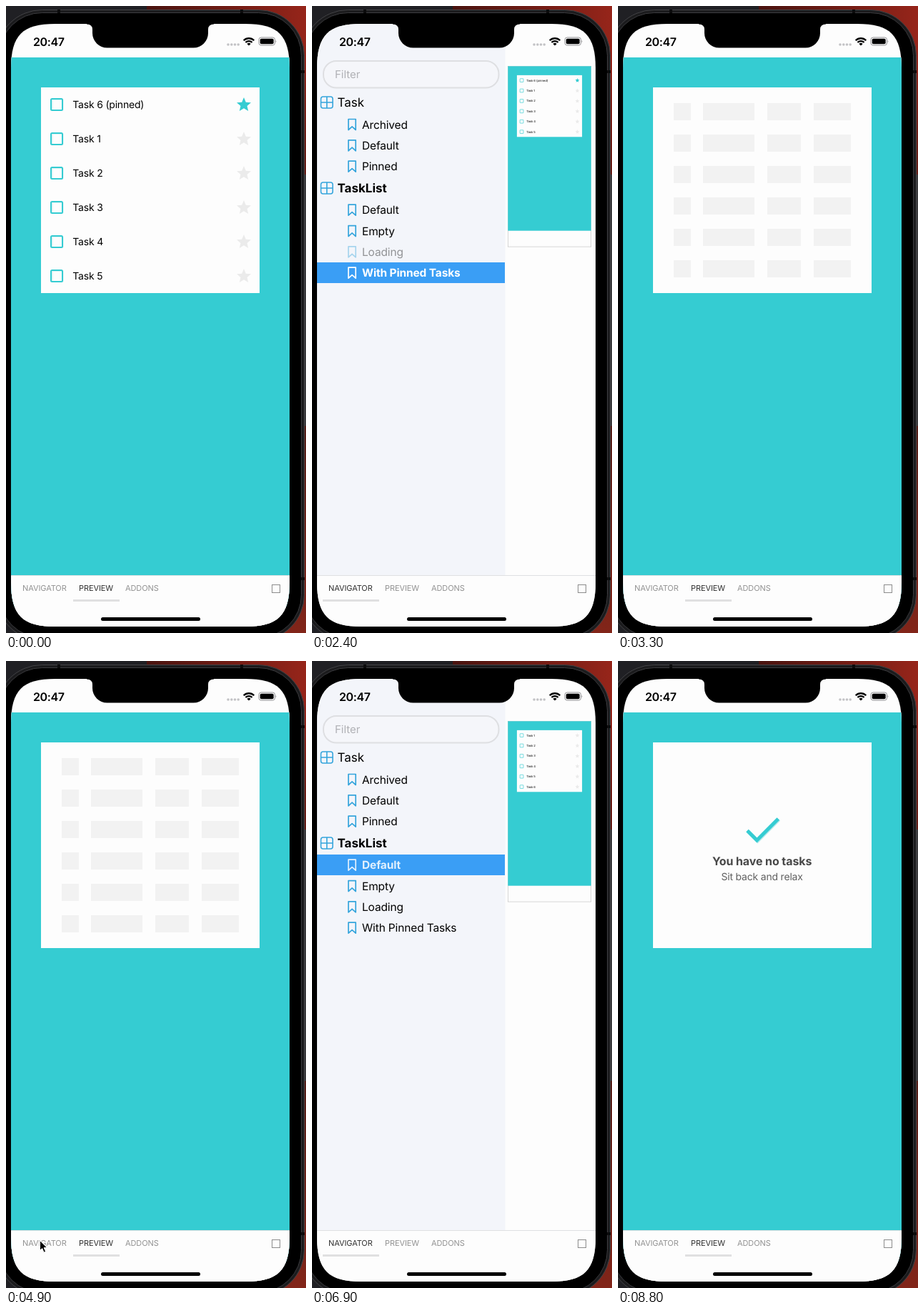
An HTML page for the animation above (9900 ms loop, 420x878 px).

```html
<!DOCTYPE html>
<html lang="en">
<head>
<meta charset="utf-8">
<title>Task list stories</title>
<style>
html, body { margin: 0; width: 100%; height: 100%; overflow: hidden; background: #000; }
svg { display: block; width: 420px; height: 878px; }
text { font-family: Inter, Roboto, "Liberation Sans", sans-serif; text-rendering: geometricPrecision; white-space: pre; }
</style>
</head>
<body>
<svg id="stage" viewBox="0 0 420 878">
  <defs>
    <linearGradient id="redTop"><stop offset="0" stop-color="#4a1410"/><stop offset="1" stop-color="#96251a"/></linearGradient>
    <linearGradient id="redSide" x2="0" y2="1">
      <stop offset="0" stop-color="#96251a"/><stop offset=".15" stop-color="#6b1c15"/>
      <stop offset=".5" stop-color="#3f1916"/><stop offset="1" stop-color="#822519"/>
    </linearGradient>
    <clipPath id="screenClip">
      <path d="M69 25H335C381 25 397 41 397 87V807C397 853 381 869 335 869H69C23 869 7 853 7 807V87C7 41 23 25 69 25Z"/>
    </clipPath>
  </defs>

  <rect width="420" height="878" fill="#202024"/>
  <rect x="197" width="223" height="60" fill="url(#redTop)"/>
  <rect x="340" y="60" width="80" height="818" fill="url(#redSide)"/>
  <g id="body">
    <rect x="-13.5" y="5.5" width="431" height="883" rx="64" fill="#1b1b1d" stroke="#434346"/>
    <rect x="-9.5" y="9.5" width="423" height="875" rx="60" fill="#000" stroke="#3c3c3f"/>
    <path d="M74 5v5M330 5v5M413 92h5M413 802h5" stroke="#0b0b0c" stroke-width="4"/>
    <path d="M419 236V588" stroke="#39393b" stroke-width="2"/>
  </g>

  <g clip-path="url(#screenClip)">
    <rect x="7" y="25" width="390" height="844" fill="#fdfdfd"/>
    <g id="preview">
      <rect width="390" height="844" fill="#fdfdfd"/>
      <rect id="border" x=".5" y=".5" width="389" height="843" fill="none" stroke="#000" stroke-opacity=".5"/>
      <g id="page">
        <rect id="backdrop" fill="#35ccd2"/>
        <rect id="card" x="42" y="42" height="288" fill="#fdfdfd"/>
      </g>
    </g>
    <g id="sidebar">
      <rect x="7" y="25" width="263.5" height="772" fill="#f3f5fa"/>
      <rect x="16" y="77" width="245.5" height="37.5" rx="18" fill="#f5f6fa" stroke="#dedfe2" stroke-width="2"/>
    </g>
    <g id="tabs">
      <rect x="7" y="797" width="390" height="72" fill="#fdfdfd"/>
      <path d="M7 797.5H397" stroke="#dfe0e2"/>
      <rect id="underline" y="831" height="3" fill="#e0e0e1"/>
      <rect x="372.5" y="810.5" width="11" height="11" fill="none" stroke="#8c8c8c"/>
    </g>
    <g id="status">
      <g fill="#c3c3c6"><circle cx="311" cy="54" r="1.8"/><circle cx="315.8" cy="54" r="1.8"/><circle cx="320.5" cy="54" r="1.8"/><circle cx="325.2" cy="54" r="1.8"/></g>
      <g fill="none" stroke="#000" stroke-width="2.3">
        <path d="M332.7 48.3a10.3 10.3 0 0 1 14.6 0M335.4 51a6.5 6.5 0 0 1 9.2 0"/>
      </g>
      <path d="M340 55.6l-2.6-2.6a3.7 3.7 0 0 1 5.2 0z"/>
      <rect x="354" y="44" width="22.5" height="11" rx="3.2" fill="none" stroke="#909093"/>
      <rect x="355.7" y="45.7" width="19" height="7.6" rx="1.8"/>
      <path d="M377.7 47.7q1.8 1.8 0 3.7z" fill="#909093"/>
    </g>
    <path d="M113 24V25.5Q121 25.5 121 33V38A20.5 20.5 0 0 0 141.5 58.5H262.5A20.5 20.5 0 0 0 283 38V33Q283 25.5 291 25.5V24Z"/>
    <rect x="133" y="856" width="139" height="5" rx="2.5"/>
  </g>
  <path id="cursor" d="M47.5 811.5V825.5L50.7 822.6L53.1 828.2L55.6 827.1L53.2 821.6H57.5Z" fill="#000" stroke="#fff" stroke-width="1"/>
</svg>

<script>
const LOOP = 9900;
const TEAL = '#35ccd2';
const BLUE = '#35a5dc';
const $ = id => document.getElementById(id);

function set(el, attrs) {
  for (const key in attrs) el.setAttribute(key, attrs[key]);
  return el;
}

function add(parent, tag, attrs) {
  return parent.appendChild(set(document.createElementNS('http://www.w3.org/2000/svg', tag), attrs));
}

// midY is the middle of the capitals
function label(parent, str, x, midY, size, attrs = {}) {
  const el = add(parent, 'text', { x, y: midY + size * 0.36, 'font-size': size, ...attrs });
  el.textContent = str;
  return el;
}

const show = (el, on) => set(el, { visibility: on ? 'visible' : 'hidden' });

// ---- status bar and tabs
label($('status'), '20:47', 38, 50, 16, { 'font-weight': 600, 'letter-spacing': -0.4 });

const tabs = [
  { name: 'PREVIEW', x: 102, left: 94, width: 65 },
  { name: 'NAVIGATOR', x: 23, left: 15, width: 79 },
  { name: 'ADDONS', x: 167 }
];
for (const tab of tabs) {
  tab.el = label($('tabs'), tab.name, tab.x, 814.7, 11, { 'letter-spacing': -0.1 });
}

// ---- sidebar
const sidebar = $('sidebar');
label(sidebar, 'Filter', 32, 96, 15, { fill: '#b0b1b5' });
const highlight = add(sidebar, 'rect', { x: 7, width: 263, height: 29, fill: '#3a9ef5' });

function heading(name, y, weight) {
  add(sidebar, 'path', {
    d: `M15.5 ${y - 8}h10.5q3 0 3 3v10q0 3-3 3h-10.5q-3 0-3-3v-10q0-3 3-3zM20.8 ${y - 8}v16M12.5 ${y}h16.5`,
    fill: 'none', stroke: BLUE, 'stroke-width': 1.6
  });
  label(sidebar, name, 35.5, y, 17, { 'font-weight': weight });
}

function story(name, y) {
  const g = add(sidebar, 'g', {});
  const icon = add(g, 'path', {
    d: `M51 ${y - 7.5}h10.2v15l-5.1-4.6l-5.1 4.6z`,
    fill: 'none', 'stroke-width': 1.7, 'stroke-linejoin': 'round'
  });
  const text = label(g, name, 70, y, 15.5, { 'letter-spacing': -0.15 });
  return { g, icon, text, y };
}

function select(item, on) {
  set(item.icon, { stroke: on ? '#fff' : BLUE });
  set(item.text, { fill: on ? '#fff' : '#000', 'font-weight': on ? 700 : 400 });
}

heading('Task', 135, 400);
['Archived', 'Default', 'Pinned'].forEach((name, i) => select(story(name, 166 + i * 29.33), false));
heading('TaskList', 255, 700);
const stories = ['Default', 'Empty', 'Loading', 'With Pinned Tasks'].map((name, i) => story(name, 285.7 + i * 29.33));

// ---- preview contents
const page = $('page');
const STAR = 'M12 17.27L18.18 21l-1.64-7.03L22 9.24l-7.19-.61L12 2 9.19 8.63 2 9.24l5.46 4.73L5.82 21z';
const starColumns = [];

function taskList(names) {
  const g = add(page, 'g', {});
  const stars = add(g, 'g', {});
  starColumns.push(stars);
  names.forEach((name, i) => {
    const y = 66 + i * 48;
    add(g, 'rect', { x: 57.5, y: y - 7, width: 15, height: 15, rx: 1, fill: 'none', stroke: '#d9f3f4', 'stroke-width': 2 });
    add(g, 'rect', { x: 56, y: y - 8, width: 16, height: 16, rx: 1.5, fill: 'none', stroke: TEAL, 'stroke-width': 2 });
    label(g, name, 86.3, y, 14, { 'letter-spacing': -0.2 });
    add(stars, 'path', {
      d: STAR, transform: `translate(314 ${y - 12})`,
      fill: name.includes('pinned') ? TEAL : '#ebebeb'
    });
  });
  return g;
}

function skeleton() {
  const g = add(page, 'g', { fill: '#f2f2f2' });
  const cells = [[71, 24], [112, 72], [202, 47], [267, 52]];
  for (let row = 0; row < 6; row++) {
    for (const [x, width] of cells) add(g, 'rect', { x, y: 64 + row * 44, width, height: 24 });
  }
  return g;
}

function emptyNote() {
  const g = add(page, 'g', {});
  const tick = { d: 'M174 165.5L187.5 179L217.3 149', fill: 'none', 'stroke-width': 5 };
  add(g, 'path', { ...tick, stroke: '#b5e9eb', transform: 'translate(1 1)' });
  add(g, 'path', { ...tick, stroke: TEAL });
  const centred = { 'text-anchor': 'middle' };
  label(g, 'You have no tasks', 194.6, 208, 16, { ...centred, 'font-weight': 700, fill: '#484848', 'letter-spacing': -0.1 });
  label(g, 'Sit back and relax', 194.6, 230, 14, { ...centred, fill: '#606060', 'letter-spacing': -0.2 });
  return g;
}

const plain = [1, 2, 3, 4, 5].map(n => 'Task ' + n);
const contents = [
  taskList([...plain, 'Task 6']),
  emptyNote(),
  skeleton(),
  taskList(['Task 6 (pinned)', ...plain])
];

// The border takes its own width from the page inside it
function layoutPage(border) {
  const width = 390 - 2 * border;
  show($('border'), border > 0);
  set(page, { transform: `translate(${border} ${border})` });
  set($('backdrop'), { width, height: 770 - 2 * border });
  set($('card'), { width: width - 84 });
  for (const stars of starColumns) set(stars, { transform: `translate(${-2 * border} 0)` });
}

// ---- timeline
const steps = (start, values) => values.map((value, i) => [start + i * 100, value]);
const OPEN = [0.06, 0.33, 0.71, 0.965, 1];
const CLOSE = [0.9, 0.59, 0.225, 0];

// 0 = full preview, 1 = navigator open
const slide = [[0, 0], ...steps(1300, OPEN), ...steps(3000, CLOSE), ...steps(5200, OPEN), ...steps(8500, CLOSE)];
const activeTab = [[0, 0], [1300, 1], [3000, 0], [5200, 1], [8500, 0]];
const chosen = [[0, 3], [2600, 2], [6800, 0], [7800, 1]];
const FADE = [0.6, 0.85, 1];
const press = [
  [[0, 1], [6600, 0.4], ...steps(6800, FADE)],
  [[0, 1], [7700, 0.4], ...steps(7800, FADE)],
  [[0, 1], [2400, 0.4], ...steps(2600, FADE)],
  [[0, 1]]
];

function at(table, t) {
  let value = table[0][1];
  for (const [time, v] of table) if (time <= t) value = v;
  return value;
}

function draw(t) {
  const p = at(slide, t);
  const tab = at(activeTab, t);
  const current = at(chosen, t);

  set($('preview'), { transform: `translate(${7 + 267 * p} ${72 + 12 * p}) scale(${1 - 0.7 * p})` });
  set(sidebar, { transform: `translate(${-263.5 * (1 - p)} 0)` });
  layoutPage(tab === 1 ? 1 : 0);
  contents.forEach((g, i) => show(g, i === current));
  set(contents[2], { opacity: 1 - p });

  set(highlight, { y: stories[current].y - 14.7 });
  stories.forEach((item, i) => {
    select(item, i === current);
    set(item.g, { opacity: at(press[i], t) });
  });

  tabs.forEach((item, i) => set(item.el, { fill: i === tab ? '#303030' : '#929292' }));
  set($('underline'), { x: tabs[tab].left, width: tabs[tab].width });
  show($('cursor'), t >= 4900 && t < 5200);
}

const start = performance.now();
function tick() {
  draw((performance.now() - start) % LOOP);
  requestAnimationFrame(tick);
}
tick();
</script>
</body>
</html>
```
